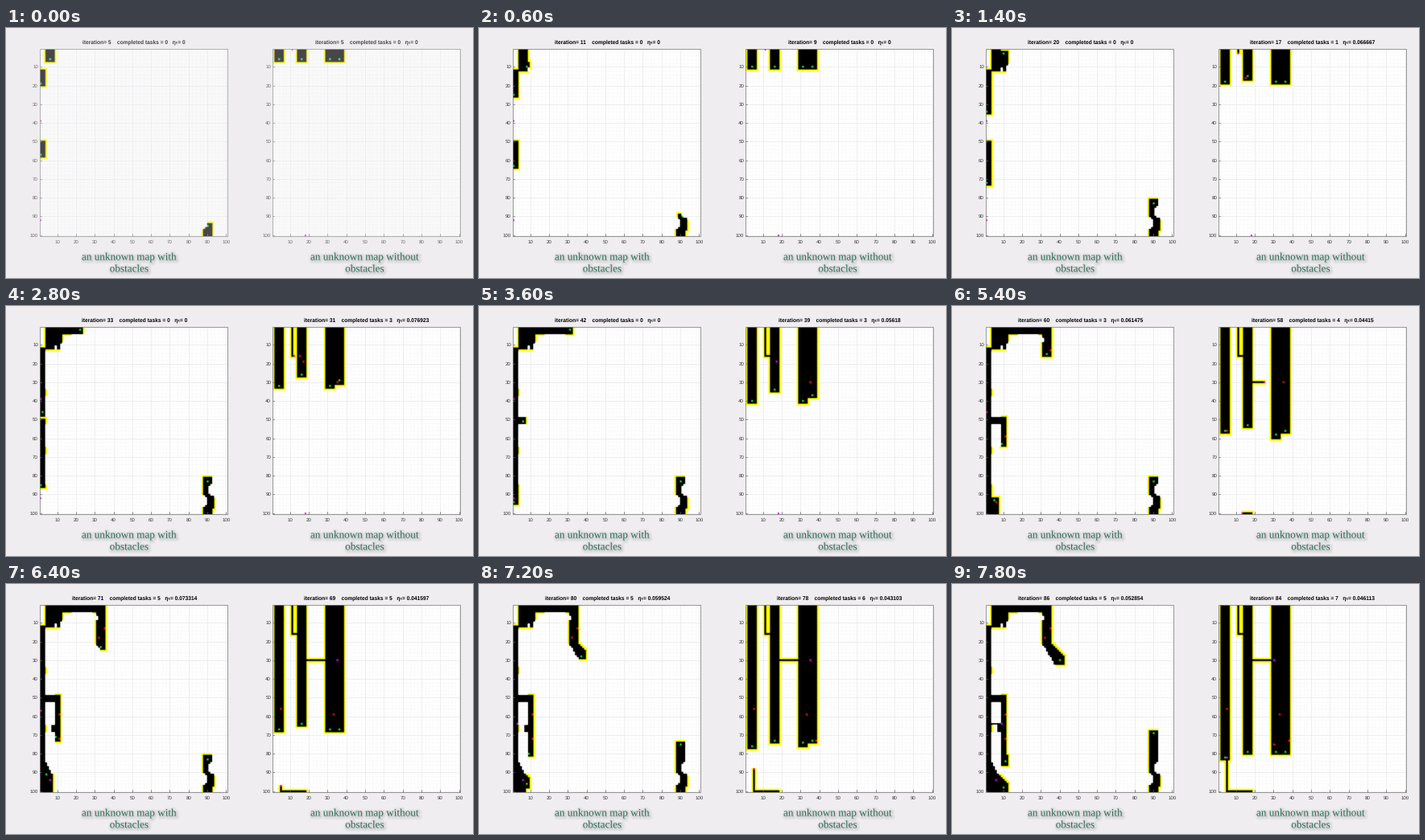
Write a matplotlib script that moves like this. It is 580 by 311 pixels and loops after 8000 ms.

```python
import numpy as np
import matplotlib.pyplot as plt
from matplotlib import patheffects
from matplotlib.animation import FuncAnimation
from matplotlib.patches import Rectangle

W, H, DPI = 580, 311, 100
FRAMES, STEP = 40, 200
N, CW, CH, TOP = 100, 2.33, 2.325, 26.2
ITERATIONS, PAUSE, REACH = 90, 3, 2
BG = "#efedef"
BLACK, YELLOW = (0, 0, 0, 1), (1, 1, 0, 1)
GREEN, RED, MAGENTA = (0.05, 0.9, 0.2, 1), (0.95, 0.05, 0.05, 1), (0.9, 0, 0.9, 1)
ROW, COL = np.mgrid[0:N, 0:N]

plt.rcParams["text.hinting"] = "none"


def px(pt):
    return pt * 72 / DPI


def trek(start, legs, tasks=(), found=None):
    """Walk one cell per iteration; a leg is (column, row[, earliest departure]).

    A scout pauses before drawing level with a new task and notes when it is found.
    """
    (c, r), path = start, [start]
    for c1, r1, *leave in legs:
        if leave:
            path += [(c, r)] * (leave[0] - len(path) + 1)
        while (c, r) != (c1, r1):
            dc, dr = c1 - c, r1 - r
            nxt = (c, r + np.sign(dr)) if abs(dr) >= abs(dc) else (c + np.sign(dc), r)
            for task in tasks:
                if task not in found and nxt[1] == task[1] and abs(nxt[0] - task[0]) <= REACH:
                    path += [(c, r)] * PAUSE
                    found[task] = len(path) - 1
            c, r = nxt
            path.append(nxt)
    return (path + [(c, r)] * ITERATIONS)[:ITERATIONS]


def no_walls(it):
    return np.zeros((N, N), bool)


def obstacles(it):
    c, r = COL, ROW
    arch = (((c - 22) / 12) ** 2 + ((r - 12) / 9) ** 2 < 1) & (c <= 30) & ((c < 28) | (r < 8))
    notch = (c == 8) & (r >= 10)  & (r <= 11)
    slope = (r > 20) & (r < 36) & (c > 22) & (c < 30 + (r - 21) * 0.6)
    bend = (c - 93) ** 2 + (r - 86.5) ** 2 < 13
    bend |= (c - 85.5) ** 2 + (r - 92.5) ** 2 < 10
    bend |= (c >= 92) & (c < 96) & (r > 64) & (r < 86)
    wall = arch | notch | slope | bend
    if it > 26:
        corridor = (r >= 48) & (r <= 51)
        niche = (r % 31 >= 2) & (r % 31 <= 5) & ((c == 3) | (c > 5))
        wall |= (c >= 3) & (c <= 7) & (r > 12) & (r < 83) & ~corridor & ~niche
        wall |= (c >= 3 + (r - 83) * 0.5) & (c < 8) & (r >= 83) & (r < 90)
    return wall


class Panel:
    def __init__(self, x0, mid, clock, scouts, workers, tasks, dist, walls):
        self.clock, self.dist, self.walls = clock, dist, walls
        self.found = {}
        self.scouts = [trek(s, legs, tasks, self.found) for s, *legs in scouts]
        self.workers = [trek(s, legs) for s, *legs in workers]
        self.draw_axes(x0)
        self.title = ax.text(mid, 19.8, "", family=["Liberation Sans", "DejaVu Sans"],
                             weight="bold", size=px(6.6), ha="center", va="baseline")

    def draw_axes(self, x0):
        x1, y1 = x0 + N * CW, TOP + N * CH
        ax.add_patch(Rectangle((x0, TOP), x1 - x0, y1 - TOP, fc="white", ec="none", zorder=1))
        font = dict(family="Liberation Sans", size=px(6.1), color="#3c3c3c", va="baseline")
        tick = dict(color="#666666", lw=px(0.7), zorder=5)
        for v in range(2, N + 1, 2):
            gx, gy = x0 + (v - 0.5) * CW, TOP + (v - 0.5) * CH
            major = v % 10 == 0
            style = dict(color="#e9e9ec" if major else "#f2f2f4", lw=px(0.8),
                         ls="-" if major else ":", zorder=2)
            ax.plot([gx, gx], [TOP, y1], **style)
            ax.plot([x0, x1], [gy, gy], **style)
            if major:
                ax.plot([gx, gx], [y1 - 2.3, y1], **tick)
                ax.plot([x0, x0 + 2.3], [gy, gy], **tick)
                ax.text(gx, 268.2, str(v), ha="center", **font)
                ax.text(x0 - 1.6, gy + 2.1, str(v), ha="right", **font)
        self.img = ax.imshow(np.zeros((N, N, 4)), extent=(x0, x1, y1, TOP),
                             aspect="auto", zorder=3)
        ax.add_patch(Rectangle((x0, TOP), x1 - x0, y1 - TOP, fc="none", ec="#808080",
                               lw=px(0.8), zorder=5))

    def explored(self, it):
        known = np.zeros((N, N), bool)
        for path in self.scouts:
            for c, r in path[:it]:
                known[max(r - REACH, 0):r + REACH + 1, max(c - REACH, 0):c + REACH + 1] = True
        known &= ~self.walls(it)
        for path in self.workers:
            if path[it] != path[0]:
                for c, r in path[:it]:
                    known[r, c] = True
        return known

    def draw(self, frame):
        it = int(round(np.interp(frame, *zip(*self.clock))))
        known = self.explored(it)
        pad = np.pad(known, 1)
        near = np.any([pad[y:y + N, x:x + N] for y in range(3) for x in range(3)], axis=0)
        cells = np.ones((N, N, 4))
        cells[..., 3] = 0
        cells[near & ~known & ~self.walls(it)] = YELLOW
        cells[known] = BLACK

        reached = {pos for path in self.workers for pos in path[:it + 1]}
        found = [task for task, t in self.found.items() if t <= it]
        dots = [(task, RED) for task in found if task not in reached]
        dots += [(path[it], MAGENTA) for path in self.workers]
        dots += [(path[it], GREEN) for path in self.scouts]
        for (c, r), color in dots:
            cells[r, c] = color
        self.img.set_data(cells)

        n = len(found)
        eta = n / (round(np.interp(it, *zip(*self.dist)) * 5) / 5)
        self.title.set_text(f"iteration= {it}    completed tasks = {n}   ηₜ= {eta:.5g}")


def caption(x, first):
    shadow = [patheffects.Stroke(linewidth=w, foreground="#666666", alpha=0.045,
                                 offset=(0.8, -0.9)) for w in (5, 3.5, 2)]
    for y, s in ((288.6, first), (303.3, "obstacles")):
        ax.text(x, y, s, family="Liberation Serif", size=px(13.2), color="#35705a",
                ha="center", va="baseline", zorder=12,
                path_effects=shadow + [patheffects.Normal()])


fig = plt.figure(figsize=(W / DPI, H / DPI), dpi=DPI, facecolor=BG)
ax = fig.add_axes([0, 0, 1, 1])

left = Panel(
    41.5, 159.3, clock=[(0, 5), (7, 20), (14, 33), (21, 49), (27, 60), (39, 86)],
    scouts=[
        [(5, 0), (5, 9), (8, 9), (9, 9), (9, 1), (32, 1), (32, 22), (39, 29)],
        [(0, 13), (0, 45), (1, 45), (1, 50), (8, 50), (8, 72), (10, 83)],
        [(0, 51), (0, 90), (3, 97), (4, 98), (4, 88), (3, 86), (9, 97)],
        [(89, 99), (89, 94), (90, 94), (90, 87), (89, 87), (89, 82), (89, 66, 72)],
    ],
    workers=[
        [(0, 38), (0, 63, 53), (8, 63)],
        [(0, 91), (5, 93, 55)],
    ],
    tasks=[(34, 12), (31, 17), (10, 58), (10, 71), (5, 93)],
    dist=[(49, 29), (60, 48.8), (71, 68.2), (86, 94.6)],
    walls=obstacles)

right = Panel(
    330.7, 447.5, clock=[(1, 5), (21, 45), (39, 84)],
    scouts=[[(c, 0), (c, 90)] for c in (3, 15, 30, 35)],
    workers=[
        [(10, 0), (10, 15, 15), (16, 15), (16, 29), (34, 29), (29, 29, 79), (29, 74)],
        [(17, 99), (4, 99, 53), (4, 55)],
    ],
    tasks=[(14, 15), (16, 18), (34, 29), (4, 55), (32, 58), (37, 72), (29, 74)],
    dist=[(17, 15), (31, 39), (45, 64.2), (58, 90.6), (69, 120.2), (84, 151.8)],
    walls=no_walls)

caption(153, "an unknown map with")
caption(445.5, "an unknown map without")
veil = ax.add_patch(Rectangle((0, 0), W, 274, fc=BG, ec="none", alpha=0, zorder=10))
ax.set_xlim(0, W)
ax.set_ylim(H, 0)
ax.axis("off")


def update(frame):
    left.draw(frame)
    right.draw(frame)
    veil.set_alpha(max(0, 0.3 - 0.15 * frame))
    return left.img, right.img, left.title, right.title, veil


anim = FuncAnimation(fig, update, frames=FRAMES, interval=STEP, repeat=True,
                     repeat_delay=0, blit=False)
plt.show()
```
